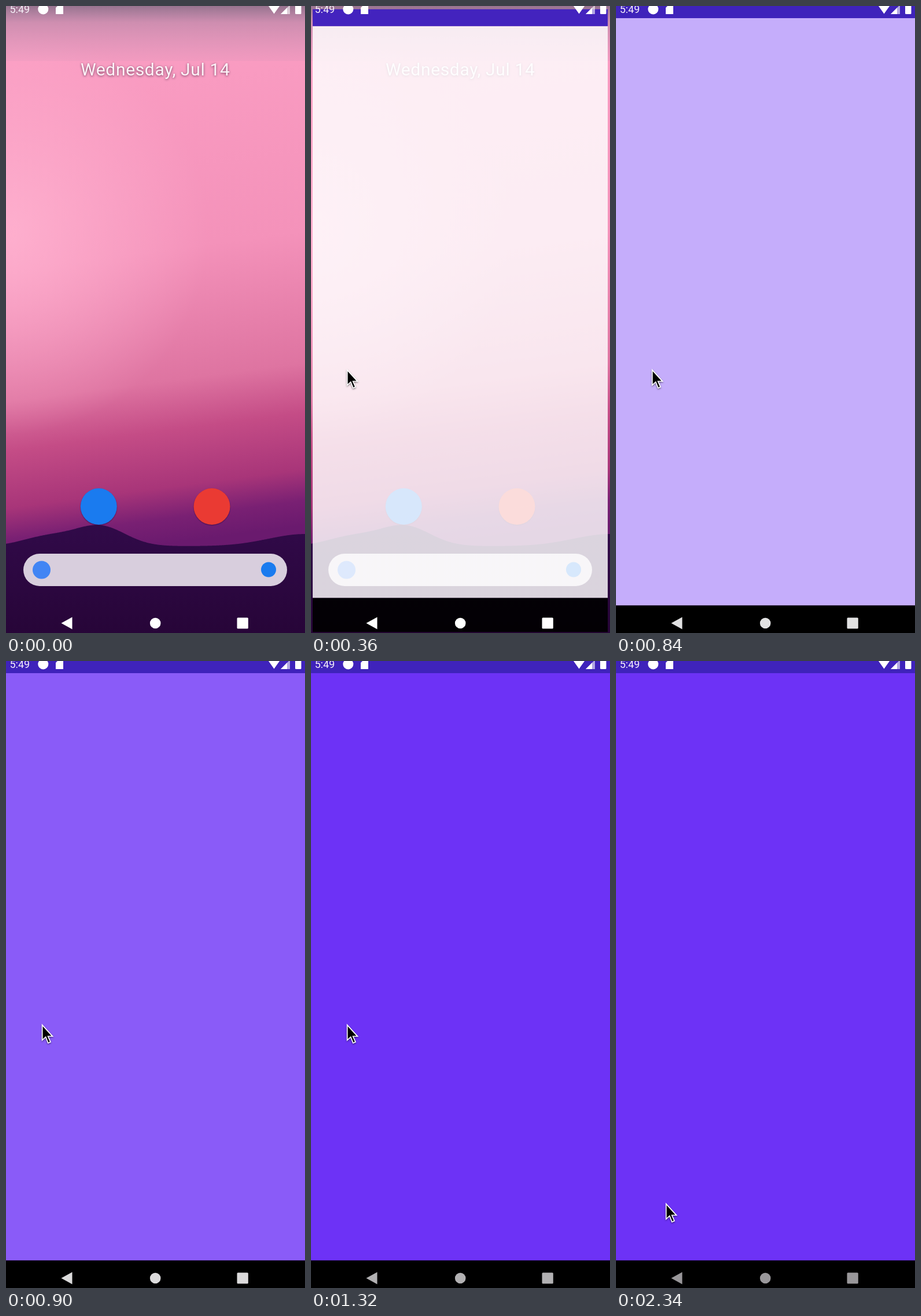
An HTML page with a canvas for the animation above (2.4 s loop, 517 px wide and 1083 px high).

```html
<!DOCTYPE html>
<html lang="en">
<head>
<meta charset="utf-8">
<title>App launch</title>
<style>
  html, body { margin: 0; width: 100%; height: 100%; overflow: hidden; background: #27053a; }
  canvas { display: block; width: 517px; height: 1083px; }
</style>
</head>
<body>
<canvas id="stage" width="517" height="1083"></canvas>
<script>
const W = 517, H = 1083, LOOP = 2400, STEP = 60;
const WHITE = [255, 255, 255];
const ctx = document.getElementById('stage').getContext('2d');

const ramp = (t, from, length) => Math.max(0, Math.min(1, (t - from) / length));
const easeOut = (u, power) => 1 - (1 - u) ** power;
const smooth = u => u * u * (3 - 2 * u);
const mix = (a, b, u) => `rgb(${a.map((v, i) => Math.round(v + (b[i] - v) * u))})`;

function addStops(g, stops) {
  for (const [at, color] of stops) g.addColorStop(at, color);
  return g;
}

const vertical = (y0, y1, stops) => addStops(ctx.createLinearGradient(0, y0, 0, y1), stops);

// Bands across the stage that rise to the right by the given slope
function tilted(slope, stops) {
  const k = H / (1 + slope * slope);
  return addStops(ctx.createLinearGradient(W / 2, 0, W / 2 + slope * k, k), stops);
}

function rect(x, y, w, h, color) {
  ctx.fillStyle = color;
  ctx.fillRect(x, y, w, h);
}

function disc(x, y, r, color) {
  ctx.fillStyle = color;
  ctx.beginPath();
  ctx.arc(x, y, r, 0, 7);
  ctx.fill();
}

function poly(points, color) {
  ctx.fillStyle = color;
  ctx.beginPath();
  points.forEach(([x, y]) => ctx.lineTo(x, y));
  ctx.closePath();
  ctx.fill();
}

function pill(x, y, w, h, r, color) {
  ctx.fillStyle = color;
  ctx.beginPath();
  ctx.roundRect(x, y, w, h, r);
  ctx.fill();
}

function shadow(color, blur, dy) {
  ctx.shadowColor = color;
  ctx.shadowBlur = blur;
  ctx.shadowOffsetY = dy;
}

// Skyline made of three rounded hills
function ridge(x) {
  const hill = (center, width, height) => height * Math.exp(-(((x - center) / width) ** 2));
  return 933 - hill(70, 60, 16) - hill(162, 62, 35) - hill(W, 90, 21);
}

function wallpaper() {
  rect(0, 0, W, H, tilted(0.13, [
    [0, '#fb9fc4'], [0.39, '#f492ba'], [0.6, '#de74a1'], [0.68, '#c44c86'],
    [0.77, '#a83579'], [0.82, '#792073'], [0.86, '#6a1a6e']]));

  const glow = ctx.createRadialGradient(0, 390, 20, 0, 390, 350);
  rect(0, 0, W, 740, addStops(glow, [[0, 'rgba(255,178,208,.85)'], [1, 'rgba(255,178,208,0)']]));

  rect(0, 0, W, 95, vertical(0, 95, [
    [0, 'rgba(70,80,100,.55)'], [0.3, 'rgba(80,95,120,.26)'], [1, 'rgba(110,120,150,.05)']]));

  const skyline = Array.from({ length: W + 1 }, (_, x) => [x, ridge(x)]);
  poly([...skyline, [W, H], [0, H]], vertical(897, H, [[0, '#310a49'], [1, '#270538']]));
}

function home() {
  wallpaper();
  ctx.save();
  shadow('rgba(70,30,60,.75)', 4, 1);
  ctx.font = '30px Roboto, sans-serif';
  ctx.letterSpacing = '0.65px';
  ctx.fillStyle = '#fdf4f8';
  ctx.fillText('Wednesday, Jul 14', 129, 119.5);
  ctx.restore();

  ctx.save();
  shadow('rgba(20,0,40,.5)', 2, 1);
  disc(160.3, 864.5, 31.5, '#1a7bef');
  disc(356, 864.5, 31.5, '#ea3a33');
  ctx.restore();

  pill(30, 946, 456, 56, 28, '#d8cedd');
  disc(61.5, 974, 15.5, '#4285f4');
  disc(454, 973.5, 13, '#1a7bef');
}

// Opening window: fades in while it grows to fill the screen
function appWindow(t) {
  const shown = ramp(t, 150, 90);
  const solid = ramp(t, 240, 150);
  const grow = easeOut(ramp(t, 180, 300), 2);
  const scale = 0.835 + 0.165 * grow;

  ctx.save();
  ctx.translate(258, 543);
  ctx.scale(scale, scale);
  ctx.translate(-258, -543);

  ctx.globalAlpha = shown * (1 - solid);
  rect(-4, 21, 524, 1014.5, tilted(0.2, [
    [0, 'rgba(233,255,255,.7)'], [0.5, 'rgba(218,246,250,.7)'], [0.62, 'rgba(255,212,230,.68)'],
    [0.79, 'rgba(255,212,230,.68)'], [0.83, 'rgba(255,255,240,.62)']]));

  ctx.globalAlpha = shown * solid;
  rect(-4, 21, 524, 1014.5, mix(WHITE, [109, 50, 246], ramp(t, 780, 150)));

  ctx.globalAlpha = shown;
  rect(-4, -9, 524, 30, mix([87, 38, 207], [63, 35, 187], grow));
  ctx.globalAlpha = shown * (0.6 + 0.4 * solid);
  rect(-4, 1035.5, 524, 60.5, '#000');
  ctx.restore();
}

function statusBar() {
  ctx.font = '18px Roboto, sans-serif';
  ctx.fillStyle = '#f6f0f8';
  ctx.fillText('5:49', 6.5, 12);
  disc(64.3, 5.5, 9, '#fff');
  poly([[86, 3], [91, -2], [99, -2], [99, 14], [86, 14]], '#fff');
  poly([[463.5, 13.5], [452.5, -2], [474.5, -2]], '#fff');
  poly([[475, 14], [491, -2], [491, 14]], 'rgba(255,255,255,.6)');
  poly([[475, 14], [486, 3], [486, 14]], '#fff');
  pill(500, -4, 10.5, 18, 1.5, '#fff');
}

function navBar(t) {
  const color = mix(WHITE, [153, 151, 154], easeOut(ramp(t, 600, 1140), 1.4));
  poly([[95.5, 1066], [114.5, 1055.5], [114.5, 1076.5]], color);
  disc(258.2, 1066, 9.3, color);
  pill(399.5, 1056.5, 19.3, 19, 1.5, color);
}

function cursor(t) {
  if (t < 60) return;
  const u = smooth(ramp(t, 2040, 300));
  ctx.save();
  ctx.translate(62 + 24 * u, 628 + 309 * u);
  const arrow = [[1.5, 3], [1.5, 25], [7, 20], [11.3, 30.8], [13.8, 29.6], [9.3, 19.4], [16.5, 19.4]];
  shadow('rgba(0,0,0,.4)', 3, 1.5);
  poly(arrow, '#000');
  ctx.strokeStyle = '#fff';
  ctx.lineWidth = 3.4;
  ctx.stroke();
  ctx.shadowColor = 'transparent';
  ctx.fill();
  ctx.restore();
}

function draw(time) {
  const t = Math.floor((time % LOOP) / STEP) * STEP;
  ctx.clearRect(0, 0, W, H);
  home();
  appWindow(t);
  statusBar();
  navBar(t);
  cursor(t);
}

let start;
function tick(now) {
  start ??= now;
  draw(now - start);
  requestAnimationFrame(tick);
}
requestAnimationFrame(tick);
</script>
</body>
</html>
```
